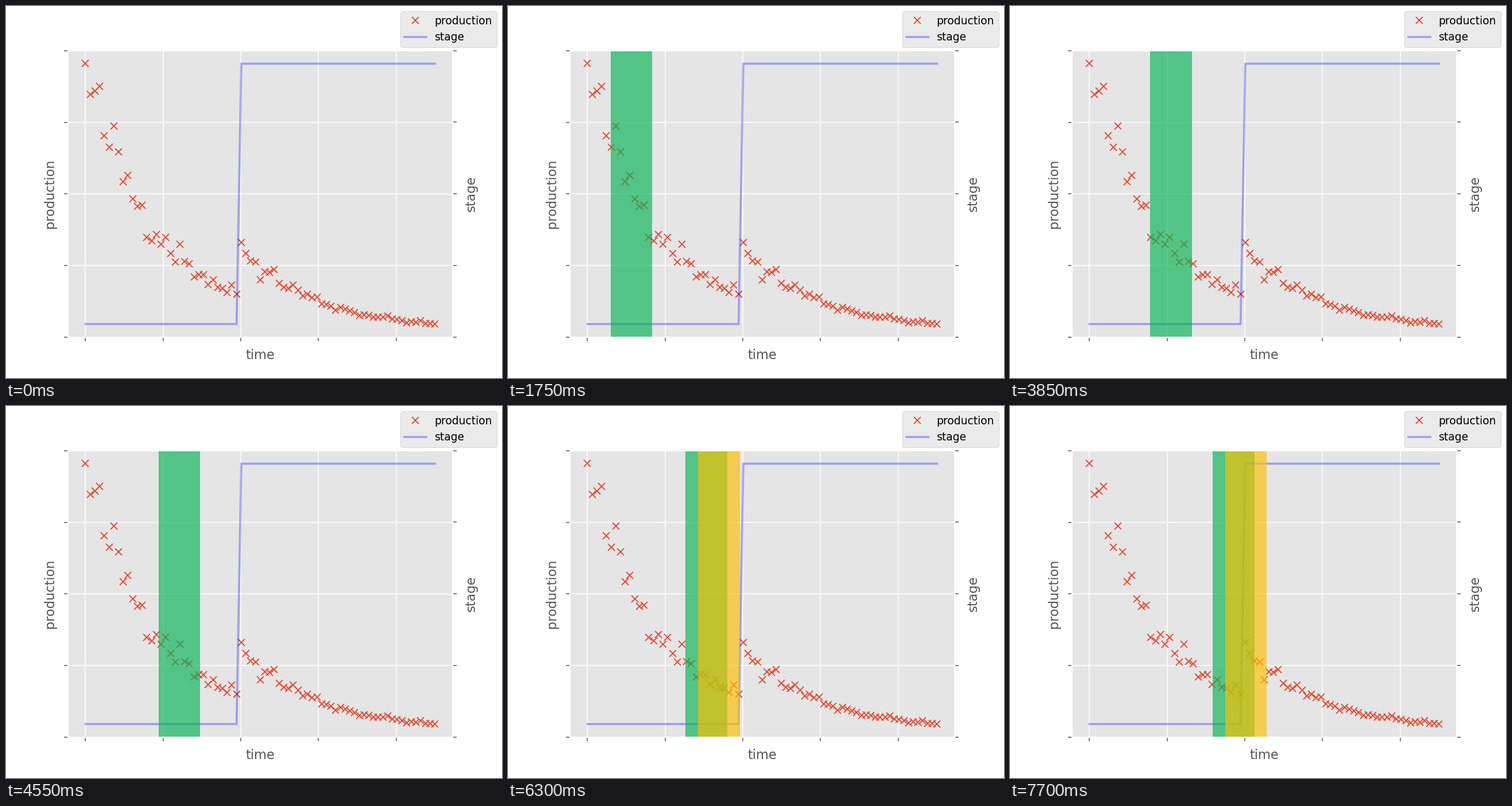
Recreate the animation shown at these times as a matplotlib script. Size 864 px wide and 648 px high, loop 8000 ms.

```python
import numpy as np
import matplotlib.pyplot as plt
from matplotlib.animation import FuncAnimation

plt.style.use("ggplot")

STEP_MS, TICK_MS, LOOP_MS = 350, 50, 8000
START, SHIFT, WIDTH = -0.5, 3.22, 10.75  # sliding window, in time units
POINTS, SWITCH = 75, 33


def decay(t, peak):
    """Exponential decline with 10 % multiplicative noise."""
    return peak * np.exp(-0.05 * t) * (1 + 0.1 * np.random.randn(len(t)))


np.random.seed(42)
time = np.linspace(0, 90, POINTS)
production = decay(time, 1)
production[SWITCH:] = decay(time[:POINTS - SWITCH], 0.32)
stage = (np.arange(POINTS) >= SWITCH).astype(float)

fig, ax = plt.subplots(figsize=(6.4, 4.8), dpi=135)
ax2 = ax.twinx()
ax2.grid(False)

ax.plot(time, production, "x", label="production")
ax2.plot(time, stage, color="blue", alpha=0.3, lw=2, label="stage")

ax.set_xlim(-4.5, 94.5)
ax.set_xticks(range(0, 81, 20))
ax.set_xticklabels([])
for a in (ax, ax2):
    lo, hi = a.get_ylim()
    a.set_ylim(lo, hi)
    a.set_yticks(np.linspace(lo, hi, 5))
    a.set_yticklabels([])

ax.set_xlabel("time")
ax.set_ylabel("production", labelpad=3.5)
ax2.set_ylabel("stage", labelpad=4.5)
fig.legend(loc="upper right")


def window(color):
    return ax2.axvspan(0, WIDTH, facecolor=color, alpha=0.65, lw=0,
                       zorder=2.2, visible=False)


current = window("#04b354")
following = window("#ffc000")


def update(i):
    step = i * TICK_MS // STEP_MS
    left = START + SHIFT * (max(step - 1, 0) // 2)
    current.set_x(left)
    current.set_visible(step > 0)
    following.set_x(left + SHIFT)
    following.set_visible(step > 0 and step % 2 == 0)
    return current, following


anim = FuncAnimation(fig, update, frames=LOOP_MS // TICK_MS,
                     interval=TICK_MS, repeat=True, repeat_delay=0)
plt.show()
```
